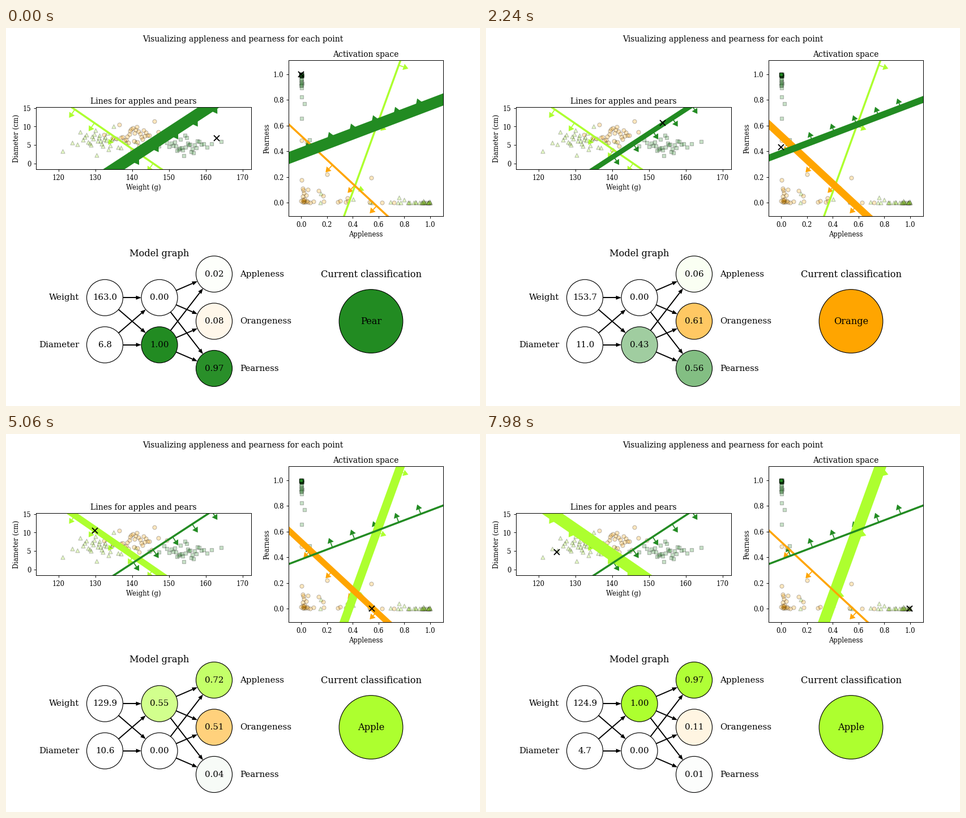
A matplotlib script for the animation above (8 s loop, 837 px wide and 669 px high).

```python
import numpy as np
import matplotlib.pyplot as plt
from matplotlib.animation import FuncAnimation
from matplotlib.colors import to_rgb
from matplotlib.patches import Circle, Polygon

W, H, DPI = 837, 669, 83.3
plt.rcParams["font.family"] = "DejaVu Serif"

APPLE, ORANGE, PEAR = "greenyellow", "orange", "forestgreen"
COLORS = [APPLE, ORANGE, PEAR]
NAMES = ["Apple", "Orange", "Pear"]

# One row per unit: two input weights and a bias
HIDDEN = np.array([[-0.4416, -0.64, 64.32], [0.4578, -0.70, -62.93]])
OUTPUT = np.array([[5.4, -1.95, -2.0], [-4.66, -5.0, 2.6], [-2.12, 5.57, -2.14]])

# Plot boxes in pixels (left, top, right, bottom) with their limits and labels
INPUT_PLOT = dict(
    box=(52, 140, 432, 250), xlim=(113.77, 172.23), ylim=(-1.69, 15.23), parts=11,
    units=HIDDEN, colors=[APPLE, PEAR],
    labels=dict(title="Lines for apples and pears", xlabel="Weight (g)",
                ylabel="Diameter (cm)", xticks=range(120, 171, 10), yticks=range(0, 16, 5)))
HIDDEN_PLOT = dict(
    box=(498, 57, 771, 333), xlim=(-0.1, 1.1), ylim=(-0.1075, 1.1075), parts=7,
    units=OUTPUT, colors=COLORS,
    labels=dict(title="Activation space", xlabel="Appleness", ylabel="Pearness",
                xticks=np.arange(6) / 5, yticks=np.arange(6) / 5))
PLOTS = [INPUT_PLOT, HIDDEN_PLOT]

RADIUS, MIDDLE, GAP = 32, 518.5, 83.5


def column(x, count):
    return [(x, MIDDLE + GAP * (i - (count - 1) / 2)) for i in range(count)]


INPUTS, HIDDENS, OUTPUTS = column(174, 2), column(270.5, 2), column(367, 3)


def activate(units, points):
    z = np.asarray(points) @ units[:, :2].T + units[:, 2]
    return 1 / (1 + np.exp(-z))


def spread(mean, sd, count):
    # Evenly ranked values of a bell-shaped distribution
    u = (np.arange(count) + 0.5) / count
    return mean + 0.55 * sd * np.log(u / (1 - u))


def harvest(rng, weight, diameter, count=34):
    return np.column_stack([spread(*weight, count),
                            rng.permutation(spread(*diameter, count))])


def boundary(unit, x):
    return -(unit[2] + unit[0] * x) / unit[1]


def tint(color, amount):
    return 1 + amount * (np.array(to_rgb(color)) - 1)


def add_plot(plot):
    x0, y0, x1, y1 = plot["box"]
    ax = fig.add_axes([(x0 + 0.5) / W, 1 - (y1 + 0.5) / H, (x1 - x0) / W, (y1 - y0) / H])
    ax.set(xlim=plot["xlim"], ylim=plot["ylim"])
    return ax


def add_canvas():
    # Whole numbers fall on pixel centres
    ax = fig.add_axes([0, 0, 1, 1])
    ax.set(xlim=(-0.5, W - 0.5), ylim=(H - 0.5, -0.5))
    ax.set_axis_off()
    return ax


def arrow(ax, tail, tip, color, lw, length, half, z=1):
    u = (tip - tail) / np.hypot(*(tip - tail))
    side = np.array([-u[1], u[0]]) * half
    neck = tip - u * length
    ax.plot(*zip(tail, neck), color=color, lw=lw, solid_capstyle="butt", zorder=z)
    ax.add_patch(Polygon([tip, neck + side, neck - side], color=color, lw=0, zorder=z))


def connect(ax, sources, targets):
    for a in np.array(sources):
        for b in np.array(targets):
            u = (b - a) / np.hypot(*(b - a)) * RADIUS
            arrow(ax, a + u, b - u, "black", 1.7, 9.5, 3.6)


def label(ax, x, y, text="", size=13, ha="center"):
    return ax.text(x, y, text, size=size, ha=ha, va="center", zorder=3)


def node(ax, pos, radius=RADIUS, size=13):
    disc = ax.add_patch(Circle(pos, radius, fc="white", ec="black", lw=1, zorder=2))
    return disc, label(ax, *pos, size=size)


def draw_normals(ax, plot):
    px = np.ptp(plot["xlim"]) / (plot["box"][2] - plot["box"][0])
    for unit, color in zip(plot["units"], plot["colors"]):
        normal = unit[:2] / np.hypot(*unit[:2])
        for x in np.linspace(*plot["xlim"], plot["parts"] + 1)[1:-1]:
            base = np.array([x, boundary(unit, x)])
            arrow(ax, base, base + normal * 18 * px, color, 1.5, 9 * px, 5.7 * px, 0.9)


def draw_scene():
    fig.suptitle("Visualizing appleness and pearness for each point")
    canvas = add_canvas()
    connect(canvas, INPUTS, HIDDENS)
    connect(canvas, HIDDENS, OUTPUTS)
    for pos, name in zip(INPUTS, ("Weight", "Diameter")):
        node(canvas, pos)
        label(canvas, pos[0] - 45.5, pos[1], name, ha="right")
    for (x, y), name in zip(OUTPUTS, ("Appleness", "Orangeness", "Pearness")):
        label(canvas, x + 45.5, y, name, ha="left")
    label(canvas, 270.5, 399, "Model graph", 14)
    label(canvas, 644, 436, "Current classification", 14)

    rng = np.random.default_rng(4)
    crops = [harvest(rng, (131, 4.3), (6.2, 1.7)),
             harvest(rng, (140.8, 3.7), (7.6, 1.7)),
             harvest(rng, (154.4, 4.2), (4.9, 1.2))]
    for plot in PLOTS:
        ax = add_plot(plot)
        ax.set(**plot["labels"])
        draw_normals(ax, plot)
        for crop, marker, color, size in zip(crops, "^os", COLORS, (36, 36, 20)):
            points = crop if plot is INPUT_PLOT else activate(HIDDEN, crop)
            ax.scatter(*points.T, s=size, marker=marker, c=color, ec="black",
                       lw=1, alpha=0.25, zorder=1)


# A hair over whole pixels keeps truncation from losing one
fig = plt.figure(figsize=((W + 0.01) / DPI, (H + 0.01) / DPI), dpi=DPI)

# Render the still parts once and reuse them as a backdrop
draw_scene()
fig.canvas.draw()
backdrop = np.array(fig.canvas.buffer_rgba())
fig.clear()
fig.figimage(backdrop, origin="upper", zorder=-1)

canvas = add_canvas()
readings = [label(canvas, *pos) for pos in INPUTS]
hidden_nodes = [node(canvas, pos) for pos in HIDDENS]
output_nodes = [node(canvas, pos) for pos in OUTPUTS]
verdict = node(canvas, (644, MIDDLE), 56.3, 14)

lines, crosses = [], []
for plot in PLOTS:
    ax = add_plot(plot)
    ax.patch.set_visible(False)
    ax.set(xticks=[], yticks=[])
    lo, hi = plot["xlim"]
    ends = np.array([2 * lo - hi, 2 * hi - lo])
    lines.append([ax.plot(ends, boundary(unit, ends), color=color, zorder=2)[0]
                  for unit, color in zip(plot["units"], plot["colors"])])
    crosses.append(ax.plot([], [], "x", color="black", ms=8.6, mew=1.6, zorder=5)[0])


def step_at(ms):
    # Three steps every 140 ms, lasting 20, 100 and 20 ms
    cycle, rest = divmod(ms, 140)
    return 3 * cycle + (rest >= 20) + (rest >= 120)


def show_layer(nodes, colors, acts, borders):
    for (disc, text), color, act, line in zip(nodes, colors, acts, borders):
        disc.set_facecolor(tint(color, act))
        text.set_text(f"{act:.2f}")
        line.set_linewidth(max(3, 18 * act))


def update(i):
    angle = 2 * np.pi * step_at(20 * i) / 300
    fruit = np.array([142.965 + 20 * np.cos(angle), 6.79 + 5 * np.sin(angle)])
    hidden = activate(HIDDEN, fruit)
    output = activate(OUTPUT, hidden)

    for text, value in zip(readings, fruit):
        text.set_text(f"{value:.1f}")
    show_layer(hidden_nodes, INPUT_PLOT["colors"], hidden, lines[0])
    show_layer(output_nodes, HIDDEN_PLOT["colors"], output, lines[1])
    for cross, (x, y) in zip(crosses, (fruit, hidden)):
        cross.set_data([x], [y])

    best = int(np.argmax(output))
    verdict[0].set_facecolor(COLORS[best])
    verdict[1].set_text(NAMES[best])
    return []


anim = FuncAnimation(fig, update, frames=400, interval=20, repeat=True, repeat_delay=0)
plt.show()
```
